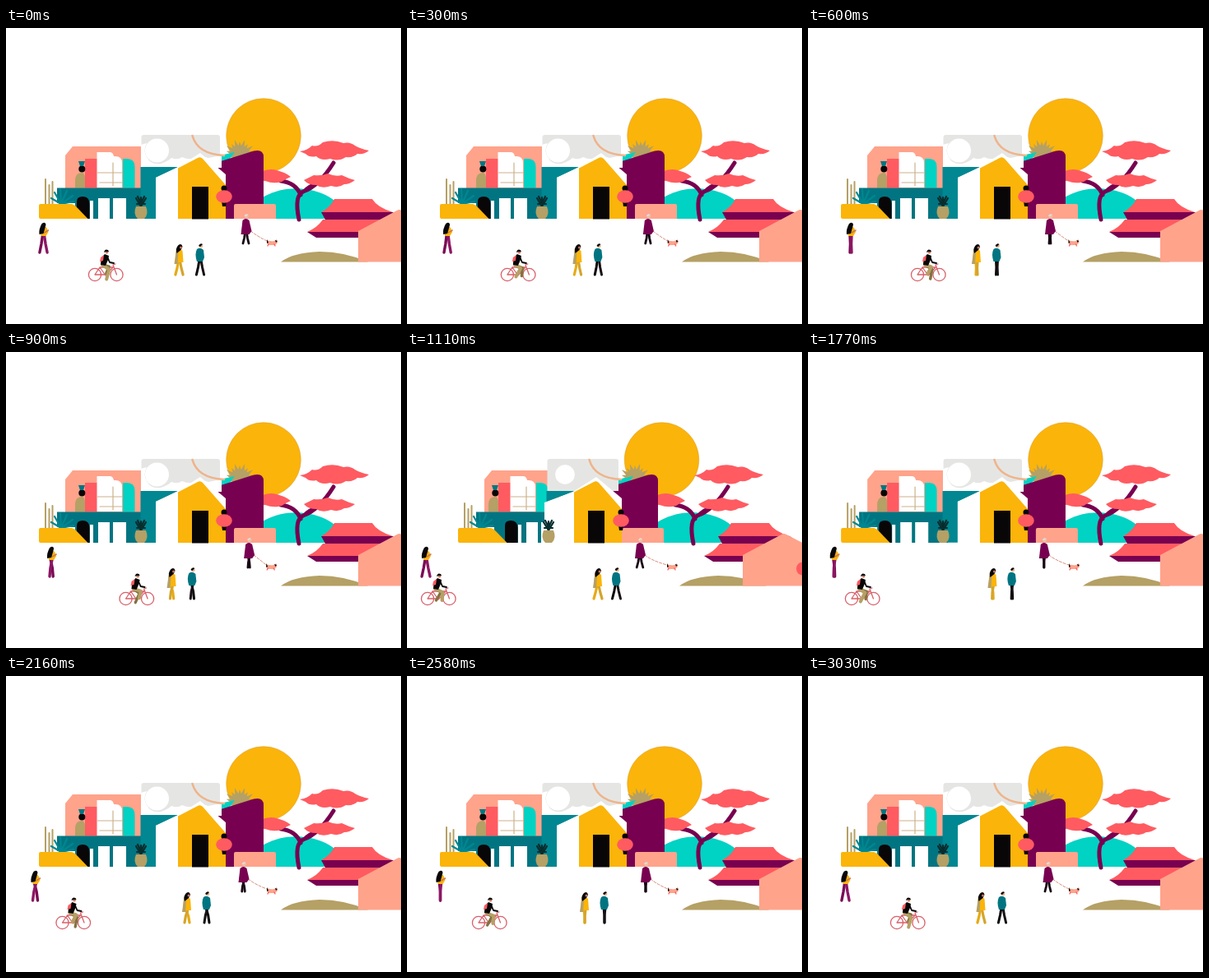
An HTML page for the animation above (3060 ms loop, 480 by 360 pixels).

```html
<!DOCTYPE html>
<html lang="en">
<head>
<meta charset="utf-8">
<title>Village stroll</title>
<style>
html, body { margin: 0; width: 100%; height: 100%; overflow: hidden; background: #fff; }
svg { display: block; width: 480px; height: 360px; }
.yellow { fill: #fbb409; } .salmon { fill: #ffa38b; } .red { fill: #ff5b61; }
.plum { fill: #780050; } .cyan { fill: #00d2c3; } .teal { fill: #007581; }
.roof { fill: #008791; } .grey { fill: #e5e6e4; } .tan { fill: #b5a065; }
.white { fill: #fff; } .ink { fill: #090608; }
.line { fill: none; stroke-linecap: round; stroke-linejoin: round; }
</style>
</head>
<body>
<svg viewBox="0 0 480 360">
  <g data-dx="-3.5"><circle class="yellow" cx="313" cy="131" r="45.3" stroke="#d99a35" stroke-width=".5"/></g>
  <g data-dx="-7"><path id="fan" class="tan"/></g>
  <g data-dx="-6"><path class="cyan" d="M290 232C306 188 382 182 411 222V232Z"/></g>

  <g data-dx="-8">
    <path class="line" stroke="#780050" stroke-width="5" d="M356 233Q350 204 361 199C376 194 388 180 398 164M358 203Q352 188 334 186"/>
    <path class="line" stroke="#780050" stroke-width="3" d="M360 200Q368 190 382 188"/>
    <path class="red" d="M357 150Q366 149 372 143Q379 145 385 139Q398 135 410 140Q418 138 424 143Q431 147 441 149Q436 154 427 153Q422 158 413 157Q404 163 394 159Q383 162 377 156Q369 158 364 153Z"/>
    <path class="red" d="M301 181Q308 179 312 174Q323 170 332 174Q340 176 346 181Q339 184 335 187Q325 190 315 186Q307 186 301 181Z"/>
    <path class="red" d="M362 185Q368 182 374 179Q384 180 391 177Q400 181 408 179Q416 183 424 185Q418 190 411 190Q404 195 395 192Q384 196 377 191Q367 191 362 185Z"/>
  </g>

  <g data-dx="-5">
    <path class="plum" d="M383 224H470L480 231V233H388Z"/>
    <path class="red" d="M383 224Q394 218 399 208H445Q451 218 470 224Z"/>
    <path class="plum" d="M366 248H480V255H377Z"/>
    <path class="red" d="M366 248Q378 243 385 233H480V248Z"/>
  </g>
  <g data-dx="-3"><path class="tan" d="M334 284.500Q349 273 381 272Q411 272 440 284.500Z"/></g>
  <g data-dx="-20">
    <path class="salmon" d="M428 247L475 222Q478 220 481 222L530 247V284.500H428Z"/>
    <circle class="red" cx="501" cy="263.500" r="8"/>
  </g>

  <g data-dx="-3"><path class="cyan" d="M260 155L278 151 270 162 260 166Z"/></g>
  <g data-dx="-8"><path class="plum" d="M258 163L301 149.500Q313 147 313 157V232H258Z"/></g>

  <g data-dx="22"><path class="salmon" d="M72 195V155L81 144H164V195Z"/></g>
  <g data-dx="15">
    <path class="red" d="M96 159H111V194.500H96Z"/>
    <path class="white" d="M110.500 194V151H126Q130 151 131 156Q141 155 141 164V194Z"/>
    <path class="line" stroke="#cdb28b" stroke-width="1.200" d="M111 176H144M114 188H144M130 164V192"/>
    <path class="cyan" d="M142 194.500V159H147Q156.500 159 156.500 169V194.500Z"/>
    <path class="tan" d="M84 194.500V186Q84 176 92 176Q96 176 96 183V194.500Z"/>
    <circle class="ink" cx="92.300" cy="171.500" r="4"/>
    <path class="teal" d="M88 162H96L94 168H90Z"/>
  </g>
  <g data-dx="22"><path class="teal" d="M62 194.500H170V232H84V213H62Z"/></g>
  <g data-dx="33">
    <path class="ink" d="M86 232V211Q86 205 93 205Q101.500 205 101.500 214V232Z"/>
    <path class="white" d="M102 210H106V233H102ZM112 207H126V233H112ZM130 207H146V233H130Z"/>
  </g>

  <path id="cloud" class="grey"/>
  <circle id="hole" class="white" cy="149"/>
  <path id="haze" class="white" d="M164 142L171 140Q166 149 171 157Q176 167 188 165Q197 162 201 158Q208 161 214 157Q222 161 230 158Q239 155 246 158L262 155V170H164Z"/>
  <path id="slope" class="roof"/>
  <path id="side" class="white"/>

  <g data-dx="-5"><path class="line" stroke="#efb48b" stroke-width="2.600" stroke-linecap="butt" d="M226.500 131C231 147 244 154 265 155"/></g>
  <g data-dx="-6">
    <path class="white" d="M203 173L236 152 267 178V194L236 157Z"/>
    <path class="yellow" d="M209 170.500L233 158Q236 156 239 159L267 191V232H209Z"/>
    <path class="ink" d="M226 193H246V232.500H226Z"/>
  </g>
  <g data-dx="-16"><path class="salmon" d="M277 216Q277 214 279 214H326Q328 214 328 216V232H277Z"/></g>
  <g data-dx="-5">
    <circle class="ink" cx="265" cy="195" r="3.500"/>
    <path class="ink" d="M262 211H268L267 217H263Z"/>
    <ellipse class="red" cx="265" cy="205" rx="9.800" ry="7.800"/>
  </g>

  <g data-dx="8">
    <path class="line" stroke="#082d2d" stroke-width="2.200" d="M164 218V206M164 217L158 207M164 217L170 207M164 213L160 205M164 213L168 205M159 214H169"/>
    <path class="tan" d="M158 217H170Q174 226 168 232H160Q154 226 158 217Z"/>
  </g>
  <g data-dx="22">
    <path class="line" stroke="#b5a065" stroke-width="2" d="M48 215V184M52.500 215V191M56.500 215V187"/>
    <path class="line" stroke="#008791" stroke-width="2.200" d="M67 214L55 207M67 214L59 200M67 214L66 196M67 214L74 198M67 214L81 204M67 214L82 211"/>
    <path class="yellow" d="M40 216Q40 214 42 214H80Q84 215 87 219L99.500 232H42Q40 232 40 230Z"/>
  </g>

  <g id="girl">
    <path class="line leg" stroke="#7a0a55" stroke-width="3.400"/><path class="line leg" stroke="#8d1765" stroke-width="3.400"/>
    <path class="yellow" d="M-3 244Q1 240 4 243L6 248 3 253H-3Z"/>
    <path class="line" stroke="#c9785c" stroke-width="1.500" d="M1 249L6 246"/>
    <path class="ink" d="M-2 238Q2 235 3 239L2 243 0 250-5 251Q-6 245-2 238Z"/>
  </g>
  <g id="lady">
    <path class="line leg" stroke="#e6ab17" stroke-width="3.200"/><path class="line leg" stroke="#d5a52b" stroke-width="3.200"/>
    <path class="yellow" d="M-4 271Q0 267 4 271L5 285H-5Z"/>
    <path class="tan" d="M-4 272L-1 271-2 287H-6Z"/>
    <path class="ink" d="M-1 264Q3 261 4 266L2 270-3 274Q-5 268-1 264Z"/>
    <circle fill="#c9785c" cx="2" cy="267" r="1.500"/>
  </g>
  <g id="man">
    <path class="line leg" stroke="#090608" stroke-width="3"/><path class="line leg" stroke="#161015" stroke-width="3"/>
    <path class="teal" d="M-4 269Q0 266 4 270L5 279 3 284H-4Q-7 275-4 269Z"/>
    <circle fill="#e8b28a" cx="1" cy="265" r="2.300"/><path class="ink" d="M-2 265Q0 261 3 263L0 266Z"/>
  </g>
  <path id="leash" class="line" stroke="#d88878" stroke-width="1" stroke-dasharray="3 2"/>
  <g id="walker">
    <path class="line leg" stroke="#170613" stroke-width="2.800"/><path class="line leg" stroke="#170613" stroke-width="2.800"/>
    <path class="plum" d="M-4 234Q0 230 4 234L7 247 4 251H-6Z"/>
    <circle fill="#ecc0a4" cx="1" cy="229" r="2.400"/><path fill="#ddd" d="M-2 229Q-1 225 3 227L0 229Z"/>
  </g>
  <g id="dog">
    <path class="salmon" d="M-6 258Q-1 260 3 259L6 257 7 261 4 264H-5Z"/>
    <path class="ink" d="M-6 257L-4 261-6 262ZM4 258L7 259 5 261Z"/>
    <path class="line" stroke="#ff5b61" stroke-width="1.300" d="M-4 263L-5 265M3 263L4 265"/>
  </g>
  <g id="rider">
    <g class="line" stroke="#d8606a" stroke-width="1.300">
      <circle cx="-13" cy="300" r="7.600"/><circle cx="13.500" cy="300" r="7.600"/>
      <path d="M-13 300L-7 291H9L0 301-7 291M-13 300H0M13.500 300L9 288 12 287"/>
    </g>
    <path id="far" class="line" stroke="#83733f" stroke-width="3.400"/>
    <path id="near" class="line" stroke="#b5a065" stroke-width="4"/>
    <path class="ink" d="M-6 288Q-6 279-1 275L4 277 3 282 0 289Z"/>
    <path class="line" stroke="#090608" stroke-width="1.800" d="M2 278L5 285 10 286"/>
    <path class="red" d="M-6 279L-2 276-3 283-7 284Z"/>
    <circle fill="#c9785c" cx="1.500" cy="272.500" r="2"/><path class="ink" d="M-2 273Q-1 268 3 270L4 272 0 272Z"/>
  </g>
</svg>
<script>
const LOOP = 3060, TICK = 30, STEP = 73.47, STEPS = 42, START = 15;
const $ = id => document.getElementById(id);
const layers = [...document.querySelectorAll('[data-dx]')];
const KEYS = [0, 5, 14, 20, 26, 35, 42];
const TRACKS = {
  girl: [23, 29, 35.5, 40.5, 45.5, 52, 57.5],
  lady: [232, 228, 220, 216, 210.5, 205, 199],
  man: [254.5, 251, 244, 240, 236, 229.5, 224],
  walker: [283, 285.5, 288.5, 290, 291.5, 294, 296],
  dog: [322, 323, 323, 323, 323, 322.5, 322],
  rider: [38, 53.5, 81.5, 100, 121, 146, 168]
};
const HIPS = { girl: [252, 273], lady: [284, 300], man: [282, 300], walker: [249, 262] };

function along(track, n) {
  let i = 0;
  while (n >= KEYS[i + 1]) i++;
  return track[i] + (track[i + 1] - track[i]) * (n - KEYS[i]) / (KEYS[i + 1] - KEYS[i]);
}
const move = (el, x) => el.setAttribute('transform', `translate(${x.toFixed(2)} 0)`);
const path = (id, d) => $(id).setAttribute('d', d);

function fanPath() {
  let d = '';
  for (let i = 0; i < 11; i++) {
    const a = Math.PI * (1 + i / 10), r = i % 2 ? 17 : 20;
    const x = 284 + r * Math.cos(a), y = 155 + r * Math.sin(a);
    const px = 3 * Math.sin(a), py = 3 * Math.cos(a);
    d += `M284 156L${284 + 8 * Math.cos(a) + px} ${155 + 8 * Math.sin(a) - py}L${x} ${y}` +
      `L${284 + 8 * Math.cos(a) - px} ${155 + 8 * Math.sin(a) + py}Z`;
  }
  return d;
}

// The house front turns as the view settles, so its edges slide at different rates.
function drawFacade(e, n) {
  const left = 164.5 + 6 * e, eave = 182 - 15 * e, ridge = 209 - 5 * e, right = 260 - 3 * e;
  path('cloud', `M${left} 169V133Q${left} 130 ${left + 3} 130H${right - 3}Q${right} 130 ${right} 133V169Z`);
  path('slope', `M${left - 1} 169H${ridge}L${Math.max(eave, left)} 182V${232 - 50 * e}H${left - 1}Z`);
  path('side', `M${eave} ${182 + e}L${ridge} 169.5H${ridge + 4}V233H${eave}Z`);
  const hazy = n >= 8;
  $('haze').style.display = hazy ? '' : 'none';
  $('hole').setAttribute('cx', hazy ? 183.5 : 186 + 6 * e);
  $('hole').setAttribute('r', hazy ? 14.5 : 11.8);
}

function walk(id, swing) {
  const [hip, foot] = HIPS[id], reach = id === 'walker' ? 3.5 : 5;
  $(id).querySelectorAll('.leg').forEach((leg, i) => {
    const side = i ? 1 : -1, x = side * (1 + reach * swing * .8);
    leg.setAttribute('d', `M${side} ${hip}L${x * .55} ${(hip + foot) / 2}L${x} ${foot}`);
  });
}

function pedal(id, angle) {
  const x = 1 + 3.5 * Math.cos(angle), y = 302 + 3.5 * Math.sin(angle);
  path(id, `M-4 288L${4 + x * .3} ${292 + (y - 302) * .5}L${x} ${y}`);
}

function draw(n) {
  const e = Math.max(0, 1 - n / 11) ** 3;
  layers.forEach(g => move(g, g.dataset.dx * e));
  drawFacade(e, n);
  const at = {};
  for (const id in TRACKS) move($(id), at[id] = along(TRACKS[id], n));
  const swing = Math.cos(Math.PI * n / 14);
  for (const id in HIPS) walk(id, swing);
  pedal('near', n * .3);
  pedal('far', n * .3 + Math.PI);
  path('leash', `M${at.walker + 6} 247Q${at.walker + 15} 254 ${at.dog - 6} 259`);
}

function frame() {
  const t = performance.now() % LOOP;
  const k = Math.floor((Math.floor(t / TICK) * TICK - .01) / STEP);
  draw((k - START + STEPS) % STEPS);
  requestAnimationFrame(frame);
}

path('fan', fanPath());
frame();
</script>
</body>
</html>
```
